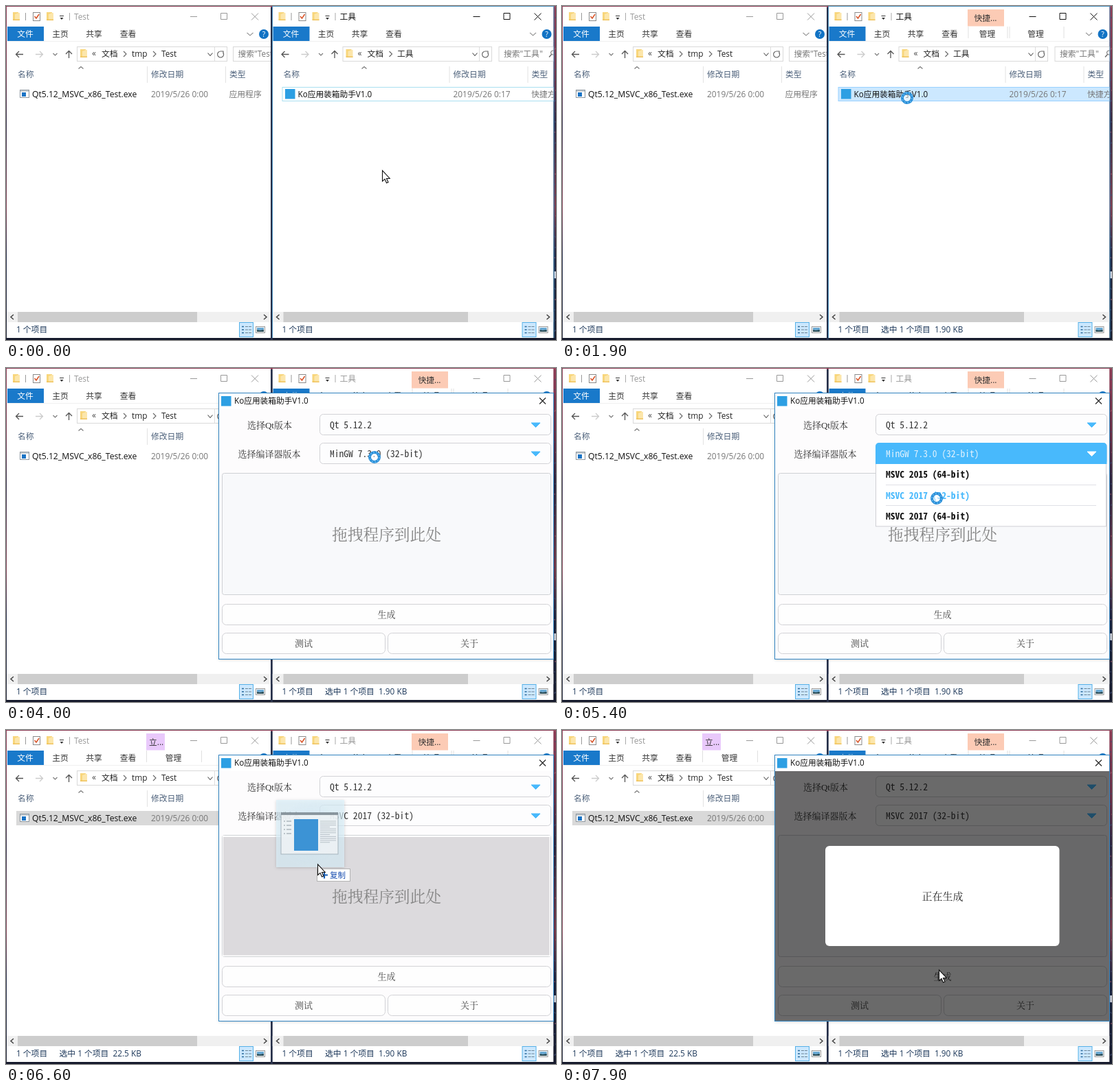
An HTML page for the animation above (8000 ms loop, 800 px wide and 487 px high).

```html
<!DOCTYPE html>
<html lang="zh-CN">
<head>
<meta charset="utf-8">
<title>打包演示</title>
<style>
html, body { margin: 0; width: 100%; height: 100%; overflow: hidden; background: #171a2c; }
svg { display: block; width: 800px; height: 487px; }
text { font: 11.8px "Open Sans", "Noto Sans CJK SC", "Noto Sans CJK JP", "Noto Sans CJK", sans-serif; white-space: pre; }
text.form { font-family: "Liberation Serif", "Noto Serif CJK SC", "Noto Sans CJK SC", "Noto Sans CJK JP", "Noto Sans CJK", serif; font-weight: 300; }
text.mono { font-family: "Noto Sans Mono CJK SC", "Noto Sans Mono CJK JP", "Liberation Mono", monospace; }
text.item { font-weight: bold; }
</style>
</head>
<body>
<svg id="stage" viewBox="0 0 800 487" xmlns="http://www.w3.org/2000/svg"></svg>
<script>
const LOOP = 8000, STEP = 100;
const TOOL = 'Ko应用装箱助手V1.0';
const BLUE = '#48b9fc', EDGE = '#d2d2d6';

// size at which one monospaced character advances 6.78px
const pen = document.createElement('canvas').getContext('2d');
pen.font = '100px "Noto Sans Mono CJK SC", "Noto Sans Mono CJK JP", "Liberation Mono", monospace';
const MONO = 678 / pen.measureText('0').width;

const rect = (x, y, x2, y2, fill, more = '') =>
  `<rect x="${x}" y="${y}" width="${x2 - x}" height="${y2 - y}" fill="${fill}" ${more}/>`;
const box = (x, y, x2, y2, fill, edge, r = 0) =>
  rect(x + .5, y + .5, x2 - .5, y2 - .5, fill, `stroke="${edge}" rx="${r}"`);
const line = (d, color, w = 1) => `<path d="${d}" fill="none" stroke="${color}" stroke-width="${w}"/>`;
const shape = (d, fill, more = '') => `<path d="${d}" fill="${fill}" ${more}/>`;
// y is the middle of the line
const text = (x, y, s, fill = '#222', size = 11.8, more = '') =>
  `<text x="${x}" y="${y + size * .37}" fill="${fill}" style="font-size:${size}px" ${more}>${s}</text>`;
const mid = (x, y, s, fill, size, cls = '') => text(x, y, s, fill, size, `text-anchor="middle" class="${cls}"`);
const mono = (x, y, s, fill, more = '', cls = '') => text(x, y, s, fill, MONO, `class="mono ${cls}" ${more}`);
const group = (id, body, more = '') => `<g id="${id}" ${more}>${body}</g>`;
const chevron = (x, y, w, h, color) => line(`M${x - w} ${y - h}L${x} ${y + h}L${x + w} ${y - h}`, color, 1.1);
const next = x => line(`M${x - 2} 66l4 4l-4 4`, '#666', 1.1);

const folder = (x, y) => rect(x, y, x + 8, y + 11, '#f8d67c') +
  shape(`M${x + 3} ${y + 3}l5 -2h2v11h-7z`, '#fce6ab') + rect(x, y + 10.5, x + 10, y + 12, '#f0c35c');

function titleBar(W, title, id) {
  const doc = box(39, 9, 50, 22, '#fff', '#8a8a8a') + line('M41.5 15l2.5 3l4 -6', '#d9562b', 1.6);
  const buttons =
    line(`M${W - 117} 15.5h10M${W - 72.5} 10.5h9v9h-9zM${W - 28} 10.5l10 10m0 -10l-10 10`, 'currentColor');
  return folder(10, 9) + line('M28.5 10v11', '#999') + doc + folder(59, 9) +
    line('M78 14.5h6', '#333') + shape('M78.5 17h5l-2.5 3z', '#333') + line('M92.5 10v11', '#aaa') +
    group(id + 'Title', text(99, 15.5, title, 'currentColor') + buttons);
}

function ribbon(W) {
  return rect(2, 30, 55, 51, '#1979ca') + mid(28, 41, '文件', '#fff') +
    mid(79, 41, '主页', '#333') + mid(128, 41, '共享', '#333') + mid(177.5, 41, '查看', '#333') +
    chevron(W - 30, 41, 4.5, 2, '#999') + `<circle cx="${W - 10}" cy="41" r="7" fill="#1273c4"/>` +
    mid(W - 10, 41, '?', '#fff', 10.5) + line(`M1 51.5H${W}`, '#f0f0f0');
}

function address(o) {
  const { W, barEnd: b } = o;
  const back = line('M25 70.5H14.5M19 66l-4.5 4.5l4.5 4.5', '#555', 1.3);
  const fwd = line('M43 70.5h10.5M49 66l4.5 4.5l-4.5 4.5', '#ccc', 1.3);
  const up = line('M91.5 76V65.5M87 70l4.5 -4.5l4.5 4.5', '#555', 1.3);
  const reload = line(`M${b - 6.5} 67.5a4.5 4.5 0 1 1 -3 -1.5m0 0h3.5v3.5`, '#666', 1.2);
  return back + fwd + chevron(71.5, 70.5, 3, 1.5, '#777') + up +
    box(103, 59, b, 81, '#fff', '#d9d9d9') + folder(108, 63) + text(125, 69, '«', '#444', 12) +
    text(139, 70, '文档') + next(173) + o.path +
    chevron(b - 25, 70.5, 3.5, 2, '#555') + line(`M${b - 18.5} 60v20`, '#ddd') + reload +
    box(330, 59, W + 20, 81, '#fff', '#d9d9d9') + text(337.5, 70, `搜索"${o.title}"`, '#777') +
    `<circle cx="409" cy="68" r="3" fill="none" stroke="#666"/>` + line('M407 70.5l-3.5 4', '#666', 1.3);
}

function footer(W, thumbEnd, size, id) {
  const view = W - 46;
  let rows = '';
  for (const y of [467.5, 472, 476.5])
    rows += line(`M${view + 4} ${y}h3`, '#2f6e9e', 1.6) + line(`M${view + 9} ${y}h4m1 0h4`, '#6c8494', 1.2);
  return rect(1, 446, W, 461, '#f0f0f0') + rect(17, 446, thumbEnd, 461, '#cdcdcd') +
    line(`M11 450l-4 3.5l4 3.5M${W - 10} 450l4 3.5l-4 3.5`, '#444', 1.5) +
    text(15, 472, '1 个项目', '#1e395b') + group(id + 'Count', text(77.5, 472, `选中 1 个项目  ${size}`, '#1e395b')) +
    box(view, 461, view + 21, 483, '#cce8ff', '#55b1e8') + rows +
    box(W - 22, 467, W - 8, 477, '#fff', '#999') + rect(W - 20, 469, W - 10, 475, '#6aa9d3') +
    shape(`M${W - 20} 475v-3l4 1l6 -1v3z`, '#2f4f58');
}

function explorer(o) {
  const { W, id, sep1, sep2 } = o;
  const columns = chevron(o.sort, 90, 3.5, -1.5, '#777') +
    text(17, 100, '名称', '#4c607a') + text(sep1 + 5, 100, '修改日期', '#4c607a') +
    text(sep2 + 5, 100, '类型', '#4c607a') + line(`M${sep1 - .5} 88v24M${sep2 - .5} 88v24`, '#e2e2e2');
  return `<clipPath id="${id}Clip"><rect x="1" y="1" width="${W - 1}" height="483"/></clipPath>` +
    group(id, rect(1, 1, W, 484, '#fff') + titleBar(W, o.title, id) + ribbon(W) + group(id + 'Tab', o.tab) +
      address(o) + columns +
      `<rect id="${id}Row" x="15.5" y="118.5" width="${o.rowEnd - 15.5}" height="20"/>` +
      o.icon + text(38, 128.5, o.file, '#111', o.fileSize) +
      text(sep1 + 5, 128.5, o.date, '#777', 11.9) + text(sep2 + 4.5, 128.5, o.kind, '#777') +
      footer(W, o.thumb, o.size, id),
      `transform="translate(${o.x})" clip-path="url(#${id}Clip)"`);
}

const tabLine = xs => xs.map(x => line(`M${x + .5} 30v17`, '#e0e0e0')).join('');
const left = explorer({
  id: 'L', x: 0, W: 385, title: 'Test', barEnd: 322, sort: 109, sep1: 206, sep2: 320, rowEnd: 400, thumb: 278,
  path: text(183, 70, 'tmp') + next(216) + text(226, 70, 'Test'),
  tab: rect(204, 5, 231, 29.5, '#e9c9fb') + text(208, 17.5, '立...', '#333') + mid(243.5, 41, '管理', '#333') + tabLine([204, 284]),
  icon: box(20, 122, 34, 134, '#fff', '#8d979f') + rect(21, 123, 33, 125, '#c4ccd2') + rect(23, 126, 29, 132, '#1b74c5'),
  file: 'Qt5.12_MSVC_x86_Test.exe', fileSize: 12.15, date: '2019/5/26 0:00', kind: '应用程序', size: '22.5 KB'
});
const right = explorer({
  id: 'R', x: 386.5, W: 410, title: '工具', barEnd: 320.5, sort: 134.5, sep1: 259, sep2: 373, rowEnd: 415, thumb: 285.5,
  path: text(182.5, 70, '工具'),
  tab: rect(203.5, 5, 256.5, 29.5, '#fccbb5') + mid(229.5, 17.5, '快捷...', '#333') + mid(232, 41, '管理', '#333') +
    mid(302.5, 41, '管理', '#333') + tabLine([204, 261, 264, 343]),
  icon: rect(19.5, 121, 34, 135.5, '#2d9fe3'),
  file: TOOL, fileSize: 11.7, date: '2019/5/26 0:17', kind: '快捷方式', size: '1.90 KB'
}) + group('Rframe', line('M387.5 484V.5H797V484', '#4a90bd'));

const arrow = (y, fill) => shape(`M764 ${y - 3}h13l-6.5 6.5z`, fill, `stroke="${fill}" stroke-linejoin="round"`);
const combo = (y, id, value) => box(456, y - 16, 793, y + 15, '#fdfdfe', EDGE, 5) +
  mono(471, y, value, '#333', `id="${id}"`) + arrow(y, BLUE);

function popup(id, y, value, items) {
  const top = y + 15, end = top + items.length * 30.3;
  let s = rect(456.5, top - .5, 791.5, end, '#fff', 'stroke="#cfcfd4"') +
    shape(`M456 ${top}V${y - 10.5}q0 -5.5 5.5 -5.5H787q5.5 0 5.5 5.5V${top}z`, BLUE) +
    mono(471, y, value, '#e2f2fd') + arrow(y, '#fff');
  items.forEach((item, i) => {
    const iy = y + 30.3 * (i + 1);
    s += mono(471, iy, item, '#111', `id="${id}${i}"`, 'item');
    if (i) s += line(`M471 ${Math.round(iy - 15) - .5}H777`, '#dfe0e6');
  });
  return group(id, s);
}

const button = (x, y, x2, label) => box(x, y, x2, y + 31, '#fefefe', EDGE, 6) + mid((x + x2) / 2, y + 15.5, label, '#444', 13, 'form');
const dialog = group('dialog',
  rect(310, 37, 797, 424, '#fff', 'filter="url(#shadow)"') + box(309, 36, 797, 425, '#fdfcfd', '#3487c4') + rect(310, 37, 796, 60, '#fff') +
  rect(313, 41, 327.5, 55.5, '#2d9fe3') + text(332, 48, TOOL, '#111', 11.7) +
  line('M776 43.5l9 9m0 -9l-9 9', '#222', 1.1) +
  mid(383.5, 83, '选择Qt版本', '#333', 13, 'form') + mid(383, 125, '选择编译器版本', '#333', 13, 'form') +
  combo(83, 'qt', 'Qt 5.12.2') + combo(125, 'kit', '') +
  box(314, 153, 793, 331, '#f8f9fb', '#cfd1d4', 3) +
  group('target', rect(315, 154, 792, 330, '#fff') + rect(316, 156, 790.5, 328.5, '#dcdadd')) +
  mid(553.5, 242.5, '拖拽程序到此处', '#858585', 22.7, 'form') +
  button(314, 344, 793, '生成') + button(314, 386, 552, '测试') + button(555, 386, 793, '关于') +
  popup('qtList', 83, 'Qt 5.12.2', ['Qt 5.12.2', 'Qt 5.6.3']) +
  popup('kitList', 125, 'MinGW 7.3.0 (32-bit)', ['MSVC 2015 (64-bit)', 'MSVC 2017 (32-bit)', 'MSVC 2017 (64-bit)']) +
  group('modal', rect(310, 60, 796, 424, '#000', 'opacity=".58"') + rect(383, 169, 723.5, 315, '#fff', 'rx="6"') +
    mid(553.5, 242, '正在生成', '#222', 15, 'form')));

// drawn around the pointer tip at 0,0
function dragImage() {
  let rows = '';
  for (let i = 0; i < 12; i++) rows += line(`M4 ${-63 + i * 2.8}h${i % 4 == 3 ? 14 : 23}`, '#aab4bb', .8);
  for (let i = 0; i < 4; i++) rows += line(`M-49 ${-63 + i * 6}h2m2 0h7`, '#8b98a1', 1.2);
  return rect(-60, -94, 39, 4, 'url(#glass)', 'filter="url(#shadow)"') +
    rect(-53, -74, 30, -15, '#f1f4f6', 'stroke="#9aa8b1" opacity=".8"') + rect(-53, -76, 30, -72, '#7f8c94', 'opacity=".85"') +
    rect(-34, -66, 1, -20, '#2e8bd3', 'opacity=".92"') + rows;
}
const copyTip = box(-1, 6, 48, 25, '#fff', '#b3b3b3') + line('M5 15.5h10M10 10.5v10', '#1a5fb4', 2.2) + text(18, 15.5, '复制', '#1a4fb0', 11.5);
const pointer = shape('M.5 0V15.5L4 12.3L6.5 18L9 17L6.5 11.5H11.2Z', '#fff', 'stroke="#111" stroke-width="1.1"');
const ring = group('spin', '<circle r="7" fill="#fff" fill-opacity=".5" stroke="#2b8fd8" stroke-width="4"/>' +
  '<circle r="7" fill="none" stroke="#6bbcf0" stroke-width="1.5" stroke-dasharray="2 2.4"/>');

let stars = '';
for (let i = 0; i < 40; i++) {
  const y = (i * 137) % 487;
  stars += rect(797.5 + i % 3, y, 798.5 + i % 3, y + 2, i % 4 ? '#3c4a70' : '#a05566');
}
document.getElementById('stage').innerHTML =
  `<defs><filter id="shadow" x="-10%" y="-10%" width="120%" height="125%"><feDropShadow dx="0" dy="1" stdDeviation="2" flood-opacity=".25"/></filter>
  <radialGradient id="glass"><stop offset="0" stop-color="#cfe6f2" stop-opacity=".85"/><stop offset="1" stop-color="#d9f0fa" stop-opacity=".65"/></radialGradient>
  <linearGradient id="sky" x2="0" y2="1"><stop offset="0" stop-color="#8c3c55"/><stop offset=".2" stop-color="#6e3048"/>
  <stop offset=".35" stop-color="#2a2440"/><stop offset=".6" stop-color="#7a3a4c"/><stop offset=".75" stop-color="#1a2340"/><stop offset="1" stop-color="#161a2c"/></linearGradient></defs>` +
  rect(0, 0, 800, 487, 'url(#sky)') + stars + rect(385, 2, 388, 487, '#27304a') + rect(797, 387, 800, 397, '#c9cdd8') +
  left + right + dialog +
  group('cursor', group('drag', dragImage()) + group('busy', ring) + group('tip', copyTip) + group('arrow', pointer));

const path = [
  [0, 547, 240], [300, 543, 222], [700, 510, 140], [1000, 500, 134], [1900, 502, 134], [2500, 537, 88], [2900, 537, 88],
  [3200, 536, 113], [3400, 536, 113], [3900, 536, 130], [4500, 536, 130], [5000, 545, 190], [5500, 545, 190],
  [6200, 120, 130], [6350, 120, 130], [6600, 453, 196], [6900, 550, 240], [7100, 550, 242], [7500, 548, 350], [8000, 548, 350]
];
function at(t) {
  const i = path.findIndex(p => p[0] > t), [t0, x0, y0] = path[i - 1], [t1, x1, y1] = path[i];
  const k = (t - t0) / (t1 - t0);
  return [x0 + (x1 - x0) * k, y0 + (y1 - y0) * k];
}

const el = id => document.getElementById(id);
const show = (id, on) => { el(id).style.display = on ? '' : 'none'; };
const paintRow = (id, fill, stroke) => { el(id).setAttribute('fill', fill); el(id).setAttribute('stroke', stroke); };

function draw(t) {
  const [x, y] = at(t), within = (a, b) => t >= a && t < b;
  const picked = t >= 900, opened = t >= 2000, taken = t >= 6400;
  const busy = within(1400, 5700), drag = within(6400, 7000), over = drag && x > 310;
  const onRow = y > 118 && y < 139;

  el('LTitle').style.color = '#999';
  el('RTitle').style.color = opened ? '#999' : '#111';
  show('Rframe', !opened);
  show('RTab', picked); show('RCount', picked);
  show('LTab', taken); show('LCount', taken);
  if (picked) paintRow('RRow', '#cce8ff', '#99d1ff');
  else paintRow('RRow', onRow ? '#e5f3ff' : '#fff', '#a9dff0');
  if (taken) paintRow('LRow', '#d9d9d9', '#d9d9d9');
  else paintRow('LRow', t > 5600 && onRow && x < 310 ? '#e5f3ff' : 'none', 'none');

  show('dialog', opened);
  show('qtList', within(2700, 3400));
  show('kitList', within(4400, 5500));
  el('qtList0').setAttribute('fill', y > 100 ? BLUE : '#111');
  for (let i = 0; i < 3; i++)
    el('kitList' + i).setAttribute('fill', Math.floor((y - 140) / 30.3) === i ? BLUE : '#111');
  el('kit').textContent = t < 5500 ? 'MinGW 7.3.0 (32-bit)' : 'MSVC 2017 (32-bit)';
  show('target', over && y > 153);
  show('modal', t >= 7700);

  el('cursor').setAttribute('transform', `translate(${x.toFixed(1)} ${y.toFixed(1)})`);
  show('drag', drag); show('tip', over); show('busy', busy); show('arrow', !busy);
  el('spin').setAttribute('transform', `rotate(${t * .36})`);
}

const start = performance.now();
function tick() {
  const t = (performance.now() - start) % LOOP;
  draw(Math.floor(t / STEP) * STEP);
  requestAnimationFrame(tick);
}
tick();
</script>
</body>
</html>
```
